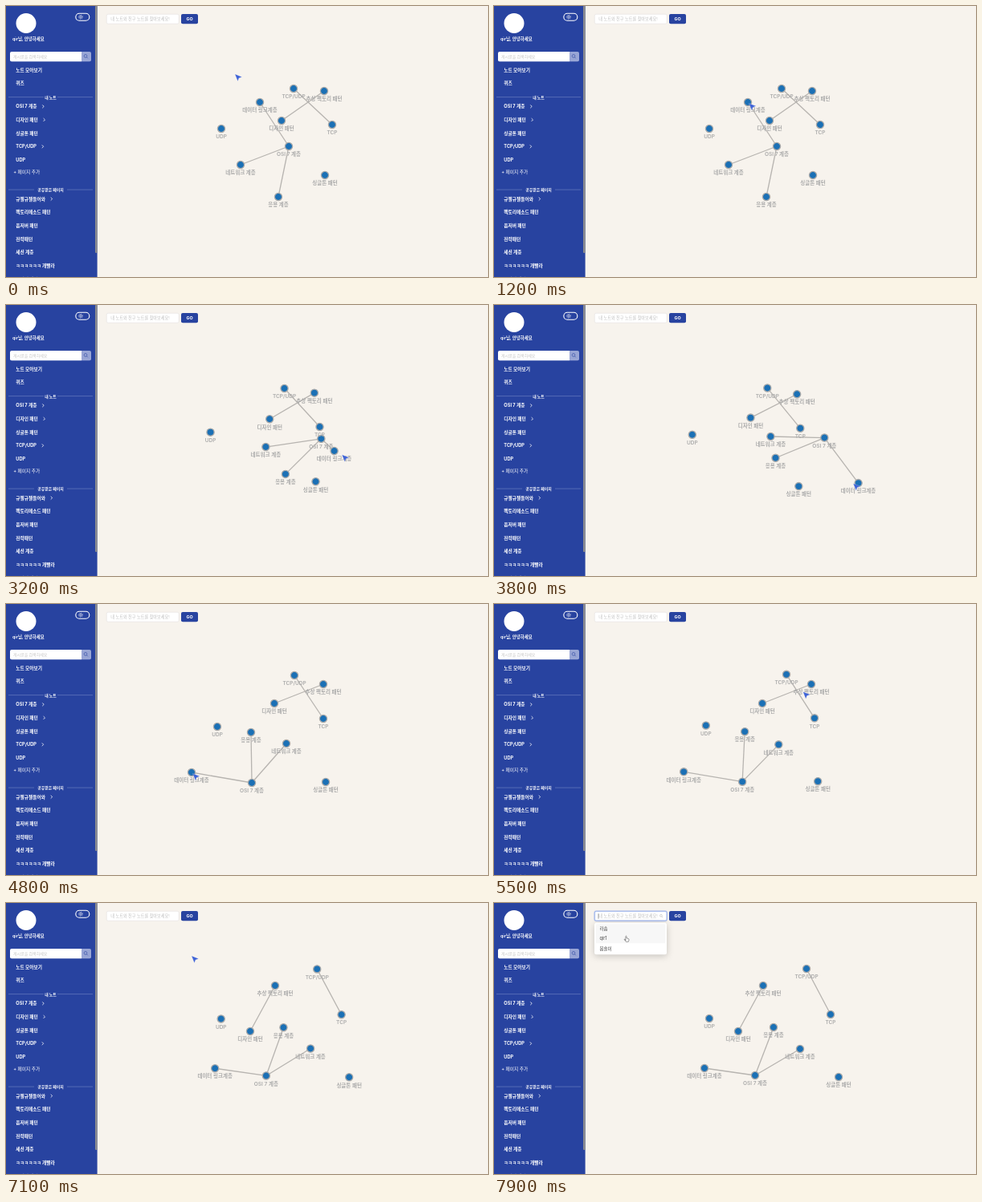
These frames come from a looping animation (600x338 px, 8 s). An HTML page:

```html
<!DOCTYPE html>
<html lang="ko">
<head>
<meta charset="utf-8">
<style>
  html, body { margin: 0; width: 100%; height: 100%; overflow: hidden; background: #f7f3ed; }
  svg { display: block; width: 100vw; height: 100vh; }
  text { font-family: Inter, "Noto Sans CJK KR", "Noto Sans CJK", sans-serif; }
</style>
</head>
<body>
<svg viewBox="0 0 600 338">
  <rect width="600" height="338" fill="#f7f3ed"/>
  <g id="graph"></g>
  <g id="sidebar">
    <rect width="113.6" height="338" fill="#2843a0"/>
    <rect x="111" width="2.6" height="308" rx="1" fill="#8b8b8d"/>
    <circle cx="25" cy="21.5" r="12.5" fill="#fff"/>
    <rect x="86.8" y="9.2" width="17" height="9" rx="4.5" fill="none" stroke="#fff" stroke-width="1.1"/>
    <circle cx="93" cy="13.7" r="1.3" fill="none" stroke="#fff" stroke-width=".7"/>
    <circle cx="93" cy="13.7" r="2.5" fill="none" stroke="#fff" stroke-width=".9" stroke-dasharray=".7 1.263"/>
    <path d="M94 57H7a2 2 0 0 0-2 2V67.3a2 2 0 0 0 2 2H94z" fill="#fff"/>
    <path d="M94 57h10a2 2 0 0 1 2 2v8.3a2 2 0 0 1-2 2H94z" fill="#98a5d5"/>
    <path d="M101.9 65.3l-1.6-1.6M100.9 62.4a1.9 1.9 0 1 1-3.8 0a1.9 1.9 0 0 1 3.8 0z" fill="none" stroke="#3d54a8" stroke-width=".7"/>
    <path d="M3 113.6H47M64 113.6H108M3 229.1H35M76 229.1H108" stroke="#7385c3" stroke-width=".6"/>
  </g>
  <g id="search">
    <rect id="field" x="125.2" y="10.2" width="90" height="12" rx="2" fill="#fff" stroke="#e2e0dd" stroke-width=".6"/>
    <rect x="218" y="10" width="21" height="12.2" rx="2" fill="#2843a0"/>
  </g>
  <g id="focus">
    <rect x="125.2" y="10.2" width="90" height="12" rx="2" fill="none" stroke="#4b76dc" stroke-opacity=".2" stroke-width="2"/>
    <path d="M130 13.2v6.4" stroke="#333" stroke-width=".5"/>
    <path d="M210 18l-1.1-1.1M209.3 15.7a1.4 1.4 0 1 1-2.8 0a1.4 1.4 0 0 1 2.8 0z" fill="none" stroke="#aaa" stroke-width=".5"/>
  </g>
  <g id="dropdown">
    <rect x="125" y="24.7" width="90" height="39.6" rx="2.5" fill="#fff" style="filter:drop-shadow(0 2.5px 4px #0003)"/>
    <rect x="126.6" y="26.2" width="86.8" height="24" rx="1.5" fill="#f7f7f7"/>
  </g>
  <path id="arrow" d="M0 0L8.7 3.4L4.9 4.9L3.5 8.8Z" fill="#3f63d6" stroke="#fff" stroke-opacity=".5" stroke-width=".4"/>
  <g id="hand">
    <path transform="scale(.8)" d="M-.8 3.4V-3q.8-1.2 1.5 0V0q1.3-.5 1.4.3q1.2-.2 1.2.6q1-.1 1 .7V3.2L3.4 5.4H-.2L-2.8 2q0-1.2 1-.6z" fill="#fff" stroke="#333" stroke-width=".6"/>
  </g>
  <g id="tooltip">
    <rect x="319.6" y="125.7" width="66" height="10.2" fill="#fff" stroke="#9a9a9a" stroke-width=".6"/>
  </g>
</svg>
<script>
const LOOP = 8000, STEP = 100;
const el = id => document.getElementById(id);

function add(parent, tag, attrs = {}) {
  const node = document.createElementNS("http://www.w3.org/2000/svg", tag);
  for (const name in attrs) node.setAttribute(name, attrs[name]);
  return parent.appendChild(node);
}

// y is the visual middle of the line
function label(parent, text, x, y, size, fill = "#fff", weight = 700, anchor = "start") {
  const node = add(parent, "text", {
    x, y: y + size * 0.36, "font-size": size, fill, "font-weight": weight, "text-anchor": anchor
  });
  node.textContent = text;
  return node;
}

// Items ending in ">" get a chevron after the text
function menu(top, spacing, items) {
  items.forEach((item, i) => {
    const y = top + i * spacing;
    const text = label(sidebar, item.replace(">", ""), 12.3, y, 5.7);
    if (!item.endsWith(">")) return;
    const x = 12.3 + text.getComputedTextLength() + 6.8;
    add(sidebar, "path", { d: `M${x} ${y - 1.9}l1.9 1.9l-1.9 1.9`, fill: "none", stroke: "#fff", "stroke-width": 0.8 });
  });
}

const sidebar = el("sidebar");
label(sidebar, "qir님, 안녕하세요", 8, 41, 5.4, "#fff", 600);
label(sidebar, "게시글을 검색하세요", 9, 63.2, 4.95, "#c4c4c4", 400);
label(sidebar, "내 노트", 55.5, 114, 4.9, "#fff", 700, "middle");
label(sidebar, "공유받은 페이지", 55.5, 229.4, 4.9, "#fff", 700, "middle");
label(sidebar, "+ 페이지 추가", 9.3, 207, 5.7, "#fff", 500);
menu(80.3, 15.5, ["노트 모아보기", "퀴즈"]);
menu(125.3, 16.65, ["OSI 7 계층>", "디자인 패턴>", "싱글톤 패턴", "TCP/UDP>", "UDP"]);
menu(240.6, 16.65, ["규젤규젤들어와>", "팩토리메소드 패턴", "옵저버 패턴", "전략패턴", "세션 계층", "ㅋㅋㅋㅋㅋㅋ 개빨라", "옵저버 패턴"]);

label(el("search"), "내 노트와 친구 노트를 찾아보세요!", 130.3, 16.1, 5.15, "#bfbfbf", 400);
label(el("search"), "GO", 228.5, 16.2, 5.4, "#fff", 700, "middle");
["라솜", "qir1", "봄솔이"].forEach((name, i) =>
  label(el("dropdown"), name, 131.5, 31.8 + i * 12.4, 5.5, "#444", 400));
label(el("tooltip"), "6554d94fe0025c4c89b70f25", 322, 131, 4.6, "#555", 400)
  .style.fontFamily = '"Noto Sans", sans-serif';

// start, middle and end: resting places before, between and after the two drags.
// swing: how far the first drag throws a node off its straight way.
const node = (text, start, middle, end, swing = [-21, 10]) => ({ text, start, middle, end, swing });
const nodes = {
  osi: node("OSI 7 계층", [352, 175], [306, 223], [325, 215], [99, -43]),
  network: node("네트워크 계층", [292, 198], [349, 174], [381, 182], [22, -23]),
  app: node("응용 계층", [339, 238], [305, 160], [348, 155], [36, -2]),
  link: node("데이터 링크계층", [316, 120], [231, 210], [262, 206], [215, 57]),
  both: node("TCP/UDP", [358, 103], [359, 89], [389, 82]),
  tcp: node("TCP", [406, 148], [395, 143], [419, 139]),
  udp: node("UDP", [268, 153], [263, 153], [268, 144]),
  singleton: node("싱글톤 패턴", [397, 211], [398, 222], [429, 217]),
  factory: node("추상 팩토리 패턴", [396, 106], [395, 100], [335, 103]),
  design: node("디자인 패턴", [343, 143], [334, 124], [304, 160])
};
const { osi, network, app, link, both, tcp, factory, design } = nodes;
const links = [[link, osi], [osi, network], [osi, app], [design, factory], [both, tcp]];

const graph = el("graph");
links.forEach(pair => pair.line = add(graph, "line", { stroke: "#b7b4b0", "stroke-width": 1.3 }));
for (const n of Object.values(nodes)) {
  n.group = add(graph, "g");
  add(n.group, "circle", { r: 4.6, fill: "#1b70b5", stroke: "#aaa", "stroke-width": 1.3 });
  label(n.group, n.text, 0, 9.9, 6.5, "#aaa", 600, "middle");
}

const progress = (t, from, to) => Math.min(1, Math.max(0, (t - from) / (to - from)));
const ease = k => k * k * (3 - 2 * k);
const mix = (a, b, k) => a.map((v, i) => v + (b[i] - v) * k);

function place(n, t) {
  const first = progress(t, 2400, 4800);
  const throwAmount = Math.sin(Math.PI * first) ** 4;
  const second = n === factory || n === design ? progress(t, 5600, 6250) : progress(t, 4800, 7500);
  return mix(mix(n.start, n.middle, first), n.end, ease(second))
    .map((v, i) => v + n.swing[i] * throwAmount);
}

// The cursor runs slightly ahead of the node it holds
const grip = (n, t) => place(n, t + 25).map(v => v + 1.4);

function cursorAt(t) {
  let p = mix([285, 85], [284, 92], progress(t, 0, 200));
  p = mix(p, grip(link, t), progress(t, 300, 1200));
  p = mix(p, grip(factory, t), ease(progress(t, 5000, 5600)));
  p = mix(p, [231, 66], ease(progress(t, 6350, 6900)));
  p = mix(p, [165, 15], ease(progress(t, 7100, 7700)));
  return mix(p, [164.5, 44], progress(t, 7700, 7900));
}

const move = (target, [x, y]) => target.setAttribute("transform", `translate(${x} ${y})`);
const fade = (id, opacity) => el(id).setAttribute("opacity", Number(opacity));

function draw(t) {
  for (const n of Object.values(nodes)) move(n.group, n.pos = place(n, t));
  for (const pair of links) {
    pair.forEach((n, i) => {
      pair.line.setAttribute("x" + (i + 1), n.pos[0]);
      pair.line.setAttribute("y" + (i + 1), n.pos[1]);
    });
  }

  const open = t >= 7800, focused = t >= 7700;
  move(el("arrow"), cursorAt(t));
  move(el("hand"), cursorAt(t));
  fade("arrow", !open);
  fade("hand", open);
  fade("dropdown", open);
  fade("focus", focused);
  el("field").setAttribute("stroke", focused ? "#7f9fe8" : "#e2e0dd");
  fade("tooltip", t > 2400 ? 0 : Math.min(1, progress(t, 1700, 1900)));
}

function tick() {
  draw(Math.floor(performance.now() % LOOP / STEP) * STEP);
  requestAnimationFrame(tick);
}
tick();
</script>
</body>
</html>
```
